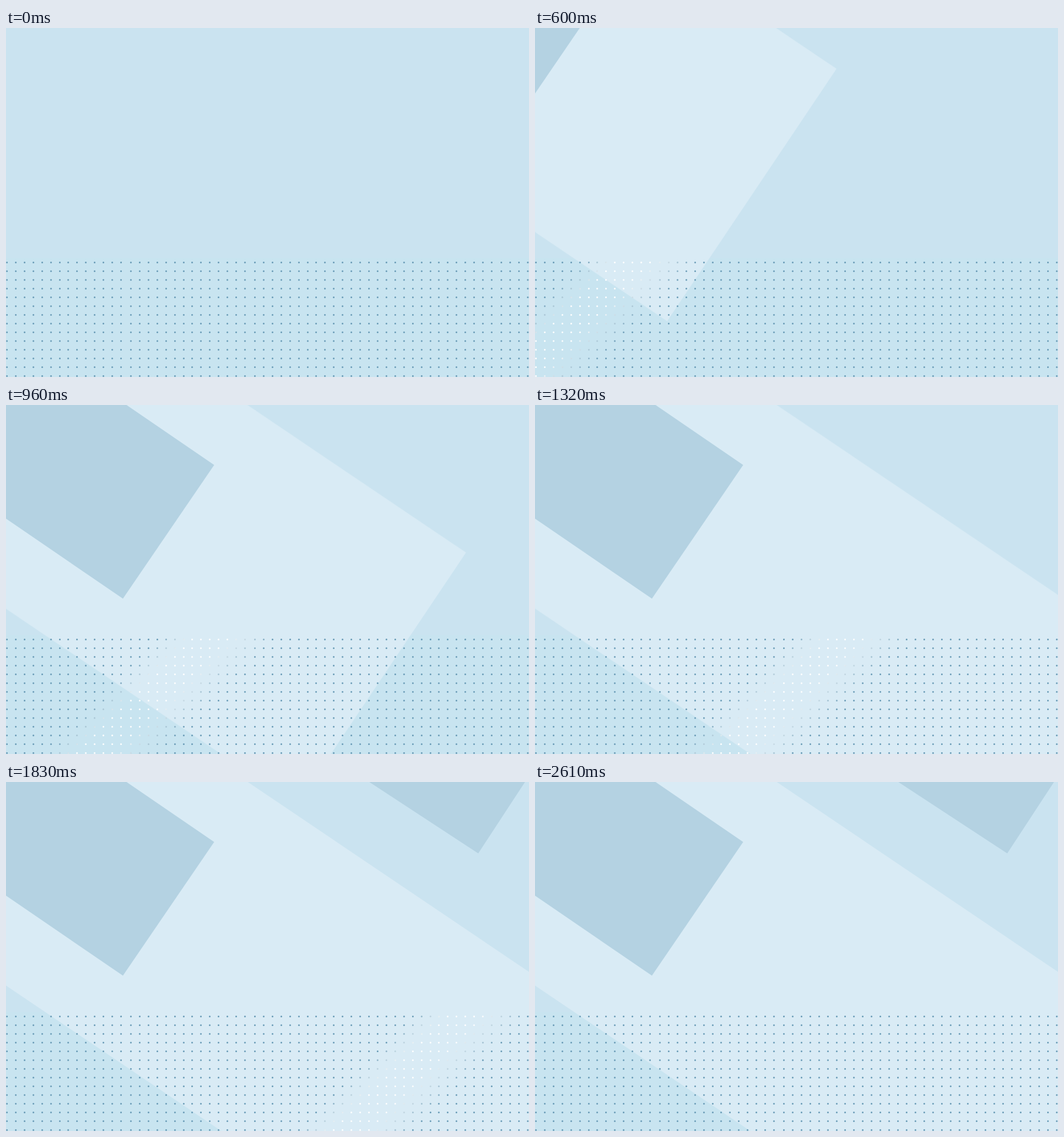
Write an HTML page that moves like this. It is 917 px wide and 611 px high and loops after 2.7 s.

```html
<!DOCTYPE html>
<html lang="en">
<head>
<meta charset="utf-8">
<title>Sliding panels</title>
<style>
  html, body { margin: 0; width: 100%; height: 100%; overflow: hidden; background: #cae3f0; }
  svg { display: block; width: 917px; height: 611px; }
  .light { fill: #d9ebf5; }
  .dark { fill: #b4d2e2; }
  .move { animation: 2700ms -1ms infinite; }
  .light { animation-name: light; }
  .left { animation-name: left; }
  .right { animation-name: right; }
  .glow { animation-name: glow; }

  /* steps of 30 ms */
  @keyframes light {
    0% { transform: translate(0, 0); animation-timing-function: steps(45); }
    50%, 100% { transform: translate(1042px, 701px); }
  }
  @keyframes left {
    0% { transform: translate(-675px, -585px); animation-timing-function: steps(30); }
    33.3333%, 100% { transform: translate(0, 0); }
  }
  @keyframes right {
    0% { transform: translate(0, -261px); animation-timing-function: step-end; }
    52.2222% { transform: translate(0, -261px); animation-timing-function: steps(12); }
    65.5556%, 100% { transform: translate(0, 0); }
  }
  @keyframes glow {
    0% { transform: translate(-134px, 0); animation-timing-function: steps(90); }
    100% { transform: translate(1246px, 0); }
  }
</style>
</head>
<body>
<svg viewBox="0 0 917 611">
  <defs>
    <linearGradient id="shine" gradientUnits="userSpaceOnUse" x1="-44" y1="366" x2="56" y2="466">
      <stop offset="0" stop-color="#fff" stop-opacity="0"/>
      <stop offset=".275" stop-color="#fff"/>
      <stop offset=".605" stop-color="#fff"/>
      <stop offset="1" stop-color="#fff" stop-opacity="0"/>
    </linearGradient>
    <mask id="grid" maskUnits="userSpaceOnUse" x="0" y="400" width="917" height="211">
      <path id="dots" fill="#fff"/>
    </mask>
  </defs>
  <rect width="917" height="611" fill="#cae3f0"/>
  <rect y="403" width="917" height="208" fill="#c8e4f0"/>
  <polygon class="move light" points="65.6,-240.2 -231.4,201.8 -1731.4,-809.2 -1434.4,-1251.2"/>
  <polygon class="move dark left" points="365,105 205,339 -395,-71 -235,-305"/>
  <polygon class="move dark right" points="828,125 992,-125 446,-125"/>
  <g mask="url(#grid)">
    <rect y="400" width="917" height="211" fill="#699bb6"/>
    <rect class="move glow" x="-400" y="400" width="600" height="211" fill="url(#shine)"/>
  </g>
</svg>
<script>
  // Five tiles side by side, each made of two blocks of seven columns.
  const tiles = [1.7, 219, 436.4, 651.6, 868.5];
  const block = 107.3, stepX = 15.45, stepY = 15.28, r = 1.5;
  const dot = (x, y) =>
    `M${(x - r).toFixed(2)} ${y.toFixed(2)}a${r} ${r} 0 1 0 ${2 * r} 0a${r} ${r} 0 1 0 ${-2 * r} 0z`;

  let d = '';
  for (const left of tiles) {
    for (let col = 0; col < 14; col++) {
      const x = left + block * Math.floor(col / 7) + stepX * (col % 7);
      for (let row = 0; row < 14; row++) d += dot(x, 410.5 + stepY * row);
    }
  }
  document.getElementById('dots').setAttribute('d', d);
</script>
</body>
</html>
```
